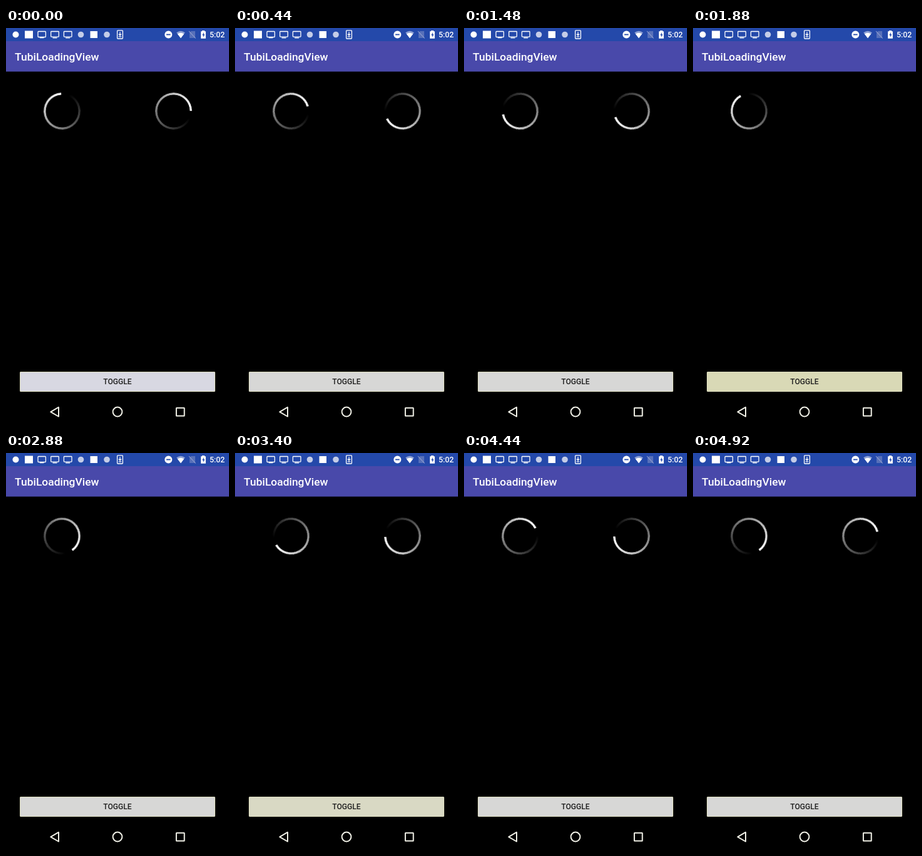
These frames come from a looping animation (356x633 px, 4960 ms). An HTML page:

```html
<!DOCTYPE html>
<html lang="en">
<head>
<meta charset="utf-8">
<title>Loading view</title>
<style>
  :root { --loop: 4960ms; }
  html, body { margin: 0; width: 100%; height: 100%; overflow: hidden; background: #000; }
  .stage { position: relative; width: 356px; height: 633px; overflow: hidden; background: #000; }
  .chrome { position: absolute; inset: 0; }
  text { font-family: Roboto, sans-serif; font-weight: 500; fill: #fff; }

  .spinner {
    position: absolute; top: 103px; width: 59px; height: 59px; border-radius: 50%;
    background: conic-gradient(#fff0 25deg, #fff 345deg);
    --ring: radial-gradient(closest-side, #0000 calc(100% - 3.9px), #000 calc(100% - 3.2px));
    -webkit-mask: var(--ring); mask: var(--ring);
  }
  .slow { left: 60px; animation: slow var(--loop) linear infinite; }
  .fast { left: 238px; animation: fast var(--loop) linear infinite, toggle var(--loop) step-end infinite; }

  .button {
    position: absolute; left: 22px; top: 548px; width: 312px; height: 32px;
    border-radius: 2px; background: #d7d7d6; box-shadow: inset 0 0 0 1px #dadabc;
    animation: press var(--loop) linear infinite;
  }

  @keyframes slow {
    0% { transform: rotate(-2deg); }
    20.161% { transform: rotate(173deg); }
    37.903% { transform: rotate(332deg); }
    58.065% { transform: rotate(505deg); }
    68.548% { transform: rotate(600deg); }
    80.645% { transform: rotate(709deg); }
    99.194% { transform: rotate(865deg); }
    100% { transform: rotate(872deg); }
  }
  @keyframes fast {
    0% { transform: rotate(90deg); }
    34.3% { transform: rotate(688deg); }
    64.9% { transform: rotate(205deg); }
    68.548% { transform: rotate(268deg); }
    100% { transform: rotate(810deg); }
  }
  @keyframes toggle {
    0% { opacity: 1; }
    34.3% { opacity: 0; }
    64.9% { opacity: 1; }
  }
  @keyframes press {
    0% { background: #d8d8e2; }
    8%, 31% { background: #d7d7d6; }
    35% { background: #d9d9b2; }
    37.9% { background: #d9d9b6; }
    43%, 62% { background: #d7d7d6; }
    66% { background: #d9d9b6; }
    68.5% { background: #d9d9c4; }
    76%, 100% { background: #d7d7d6; }
  }
</style>
</head>
<body>
<div class="stage">
  <div class="spinner slow"></div>
  <div class="spinner fast"></div>
  <div class="button"></div>

  <svg class="chrome" width="356" height="633" viewBox="0 0 356 633">
    <defs>
      <g id="monitor" fill="none" stroke="#fff" stroke-width="1.3">
        <rect x="-6.3" y="-5" width="12.6" height="8.6" rx=".8"/>
        <path d="M-3.5 5.3h7"/>
      </g>
    </defs>

    <rect width="356" height="21" fill="#2449aa"/>
    <rect y="21" width="356" height="48.5" fill="#4949aa"/>

    <!-- notifications -->
    <g fill="#fff">
      <circle cx="15.5" cy="10.5" r="5"/>
      <rect x="30" y="4.5" width="13" height="12"/>
      <circle cx="119.5" cy="10.5" r="4.8" fill="#c4cde8"/>
      <rect x="134.5" y="5" width="11.5" height="11"/>
      <circle cx="161" cy="10.5" r="4.8" fill="#c4cde8"/>
    </g>
    <g fill="none" stroke="#fff" stroke-width="1.3">
      <rect x="51" y="5.5" width="12.4" height="9" rx="1"/>
      <path d="M54 15.6h6.4"/>
      <rect x="177.6" y="3.8" width="8.8" height="13.2" rx="1"/>
      <path d="M182 6.5v5M179.8 9.6l2.2 2.2 2.2-2.2M179.8 13.9h4.4"/>
    </g>
    <use href="#monitor" x="78" y="10.5"/>
    <use href="#monitor" x="98.7" y="10.5"/>

    <!-- system state -->
    <circle cx="259.3" cy="10.5" r="6" fill="#fff"/>
    <path d="M256 10.5h6.6" stroke="#2449aa" stroke-width="1.8"/>
    <path d="M272.2 7.3Q279 2.2 285.8 7.3L279 16.3Z" fill="#8fa2d4"/>
    <path d="M273.8 9.4Q279 6 284.2 9.4L279 16.3Z" fill="#fff"/>
    <path d="M295.5 5h6.5v11h-9V7.5Z" fill="#8a97c8" opacity=".5"/>
    <path d="M292 5l10.7 11.5" stroke="#98a4d2" stroke-width="1.1"/>
    <path d="M313 4h4v1.3h1.9v11.5h-7.8V5.3H313Z" fill="#fff"/>
    <path d="M315.8 7l-2.6 4.5h1.6v3.3l2.6-4.6h-1.6Z" fill="#2449aa"/>
    <text x="325" y="15" font-size="12.3">5:02</text>

    <text x="14" y="52" font-size="17.4">TubiLoadingView</text>
    <text x="178" y="568.2" font-size="12.1" text-anchor="middle" style="fill:#202020">TOGGLE</text>

    <!-- navigation -->
    <g fill="none" stroke="#f0f0e6" stroke-width="2" stroke-linejoin="round">
      <path d="M84 604.7v14.8L71.3 612.1Z"/>
      <circle cx="178" cy="612" r="7.4"/>
      <rect x="271.9" y="605.8" width="12.8" height="12.8" rx=".5"/>
    </g>
  </svg>
</div>
</body>
</html>
```
